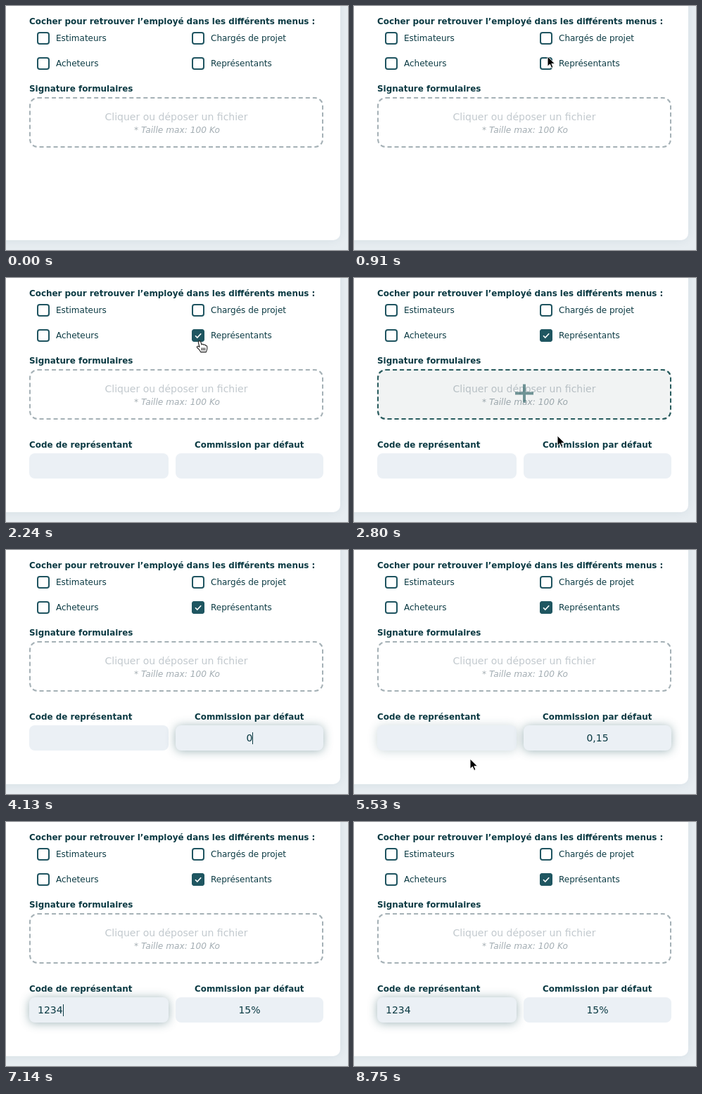
An HTML page that plays this animation: 486 by 348 pixels, repeating every 9100 ms.

```html
<!DOCTYPE html>
<html lang="fr">
<head>
<meta charset="utf-8">
<title>Formulaire employé</title>
<style>
html, body { margin: 0; width: 100%; height: 100%; overflow: hidden; background: #e7edf1; }
body { font: 12px/20px "DejaVu Sans", sans-serif; color: #0b3a43; }
body *, #card { position: absolute; box-sizing: border-box; white-space: pre; }
#card { left: -20px; top: -20px; width: 495px; height: 354px; background: #fff; border-radius: 0 0 10px 0;
  box-shadow: 0 0 14px rgba(30, 70, 90, .08); }
b { font-size: 11.92px; }
.box { width: 18px; height: 18px; border: 2px solid #1f5460; border-radius: 4px; background: #fff; }
.box.hover { border: 1px solid #2f7880; }
#tick { left: 264px; top: 73px; width: 18px; height: 18px; background: #1f5661; border-radius: 4px; }
#drop, #dropOn { left: 33px; top: 130px; width: 418px; height: 72px; border: 2px dashed #a5b1b6; border-radius: 12px; }
#dropOn { border-color: #285c5e; background: rgba(50, 80, 75, .065); }
.line { left: 33px; width: 418px; text-align: center; }
.field { top: 250px; height: 36px; border-radius: 8px; background: #ebf0f5; font-size: 14px; line-height: 37px; }
#code { left: 33px; width: 198px; padding-left: 12px; }
#rate { left: 241px; width: 210px; text-align: center; }
.field span { position: relative; display: inline-block; height: 36px; vertical-align: top; }
.field i { right: -1px; top: 10px; width: 1px; height: 17px; background: #0b3a43; }
#extra { left: 0; top: 0; width: 486px; height: 348px; }
svg { left: 0; top: 0; overflow: visible; }
#tick svg { width: 18px; height: 18px; }
</style>
</head>
<body>
<div id="card"></div>
<b style="left:33px;top:12px">Cocher pour retrouver l’employé dans les différents menus :</b>
<div class="box" style="left:44px;top:37px"></div><div style="left:71px;top:36px">Estimateurs</div>
<div class="box" id="project" style="left:264px;top:37px"></div><div style="left:291px;top:36px">Chargés de projet</div>
<div class="box" style="left:44px;top:73px"></div><div style="left:71px;top:72px">Acheteurs</div>
<div class="box" id="sales" style="left:264px;top:73px"></div><div style="left:291px;top:72px">Représentants</div>
<div id="tick"><svg><path d="M5 9.2l2.8 2.8L13.2 6.2" fill="none" stroke="#fff" stroke-width="1.6"/></svg></div>

<b style="left:33px;top:108px">Signature formulaires</b>
<div id="drop"></div>
<div class="line" style="top:148px;font-size:14px;color:#c2c9ce">Cliquer ou déposer un fichier</div>
<div class="line" style="top:167px;left:34px;font-size:12.2px;font-style:italic;color:#a3adb3">* Taille max: 100 Ko</div>
<div id="dropOn"><svg width="414" height="68"><path d="M194 32.5h26M207 19.5v26" stroke="#2a5f62" stroke-opacity=".65" stroke-width="4"/></svg></div>

<div id="extra">
  <b style="left:33px;top:228px">Code de représentant</b>
  <b style="left:268px;top:228px">Commission par défaut</b>
  <div class="field" id="code"><span><span></span><i></i></span></div>
  <div class="field" id="rate"><span><span></span><i></i></span></div>
</div>

<svg id="pointer" width="1" height="1" stroke-linejoin="round">
  <path id="arrow" d="M0 .8V15.3L3.4 12.1 5.7 17.4 8 16.4 5.8 11.3H10.5Z" fill="#000" stroke="#fff"/>
  <g id="hand" stroke="#222" stroke-width="1.1">
    <path fill="#fff" d="M-2 8.5L-3.6 2.5Q-4-.2-2-.4Q-.6-.4 0 1.6L1 5Q2.2 3.8 3.4 4.6L4 5.4Q5.4 4.4 6.4 5.8L6.8 6.6Q8.6 6.2 8.8 8V11Q8.4 13 7.4 15.6H-.4Q-1 13.6-3 11.6L-5.6 9Q-5.8 6.6-3.6 7.4Z"/>
    <path d="M1.2 9.5v4M3.4 9.5v4M5.6 9.5v4"/>
  </g>
  <path id="beam" d="M-3-8.5Q0-8.5 0-6.5V6.5Q0 8.5-3 8.5M3-8.5Q0-8.5 0-6.5M0 6.5Q0 8.5 3 8.5" fill="none" stroke="#222"/>
</svg>

<script>
const LOOP = 9100, STEP = 70;
const el = id => document.getElementById(id);
const ramp = (t, start, length) => Math.min(1, Math.max(0, (t - start) / length));
const within = (t, ...spans) => spans.some(([a, b]) => t >= a && t < b);
const latest = (t, list) => list.reduce((value, [at, next]) => t >= at ? next : value, "");

// Each trip is a run of [time, x, y]; the pointer is hidden after its end time.
const trips = [
  { end: 4130, path: [[280, 256, 332], [350, 256, 232], [420, 263, 116], [490, 271, 68], [560, 275, 47],
    [700, 275, 47], [1050, 275, 87], [1260, 275, 87], [1400, 277, 90], [2590, 277, 90], [2660, 279, 120],
    [2730, 284, 178], [2800, 289, 224], [2940, 296, 255], [3430, 303, 274], [3500, 303, 274], [3640, 352, 268]] },
  { end: 6860, path: [[5180, 352, 268], [5320, 285, 268], [5460, 185, 286], [5530, 165, 297], [5740, 160, 306],
    [5950, 168, 292], [6090, 171, 288]] },
  { end: 8260, path: [[7630, 171, 288], [7840, 178, 294], [8050, 192, 318], [8260, 203, 350]] }
];

function pointerAt(t) {
  const trip = trips.find(({ end, path }) => t >= path[0][0] && t < end);
  if (!trip) return null;
  const { path } = trip;
  const next = path.findIndex(([at]) => at > t);
  if (next < 0) return path[path.length - 1].slice(1);
  const [t0, x0, y0] = path[next - 1], [t1, x1, y1] = path[next];
  const k = (t - t0) / (t1 - t0);
  return [x0 + (x1 - x0) * k, y0 + (y1 - y0) * k];
}

function pointerKind(x, y, t) {
  if (y > 130 && y < 202 || y < 92 && (y > 72 || y < 56)) return "hand";
  const overField = y > 250 && y < 289 && (x < 231 || x > 241);
  return t > 2800 && overField ? "beam" : "arrow";
}

function drawPointer(t) {
  const at = pointerAt(t);
  el("pointer").style.display = at ? "" : "none";
  if (!at) return;
  const [x, y] = at, kind = pointerKind(x, y, t);
  el("pointer").style.transform = `translate(${x}px, ${y}px)`;
  for (const id of ["arrow", "hand", "beam"]) el(id).style.display = id === kind ? "" : "none";
}

function drawField(id, text, glow, caret) {
  const field = el(id);
  field.style.boxShadow = `0 1px 14px rgba(30, 80, 90, ${0.42 * glow})`;
  field.querySelector("span span").textContent = text;
  field.querySelector("i").style.display = caret ? "" : "none";
}

function draw(t) {
  el("project").classList.toggle("hover", within(t, [560, 840]));
  el("sales").classList.toggle("hover", within(t, [980, 2660]));
  el("sales").style.boxShadow = within(t, [1260, 1400]) ? "0 1px 12px rgba(30, 80, 90, .3)" : "none";
  el("tick").style.opacity = ramp(t, 1820, 140);
  el("dropOn").style.opacity = ramp(t, 2620, 150) - ramp(t, 2800, 200);
  el("extra").style.opacity = ramp(t, 1960, 280);

  drawField("rate",
    latest(t, [[4130, "0"], [4410, "0,"], [4620, "0,15"], [6230, "15%"]]),
    ramp(t, 2870, 200) - ramp(t, 6100, 130),
    within(t, [3430, 3920], [4130, 5180], [5670, 6160]));
  drawField("code",
    latest(t, [[6860, "1"], [6930, "12"], [7000, "123"], [7140, "1234"]]),
    ramp(t, 5250, 150) - ramp(t, 5460, 150) + ramp(t, 5980, 150),
    within(t, [6160, 6720], [6860, 7630], [8190, 8750]));
  drawPointer(t);
}

const start = performance.now();
function frame() {
  const t = (performance.now() - start) % LOOP;
  draw(Math.floor(t / STEP) * STEP);
  requestAnimationFrame(frame);
}
frame();
</script>
</body>
</html>
```
